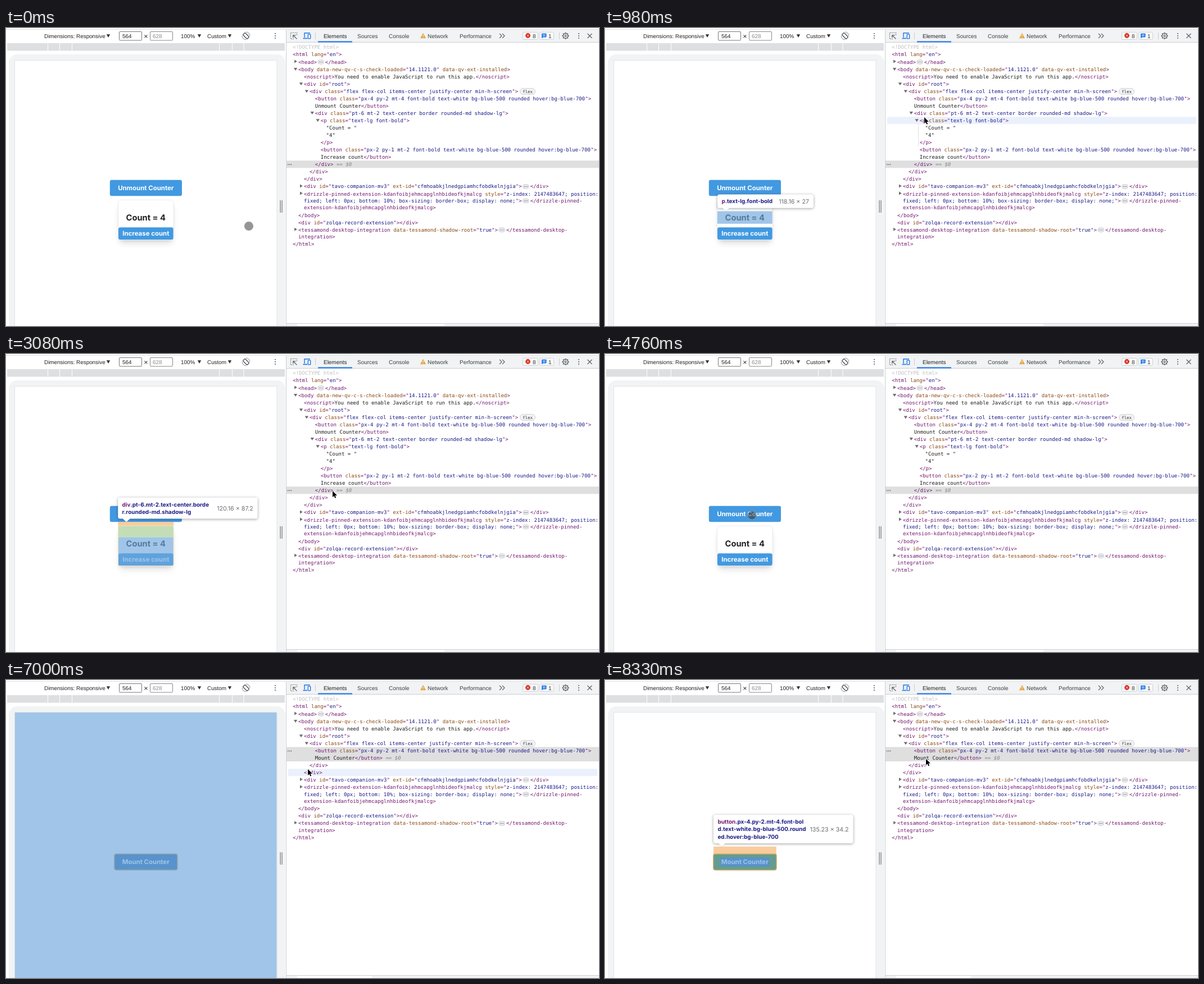
Animation of 1055x531 px, one loop 9380 ms. Source, as an HTML page with a canvas:

```html
<!DOCTYPE html>
<html lang="en">
<head>
<meta charset="utf-8">
<title>Counter inspection</title>
<style>
html, body { margin: 0; width: 100%; height: 100%; overflow: hidden; background: #fff; }
canvas { display: block; width: 1055px; height: 531px; }
</style>
</head>
<body>
<canvas id="stage" width="1055" height="531"></canvas>
<script>
const ctx = document.getElementById('stage').getContext('2d');
const LOOP = 9380, STEP = 70, UPDATE = 5600, FLASH = 1400;
const MONO = '"DejaVu Sans Mono", monospace';
const UI = '"Liberation Sans", Arial, sans-serif';
const APP = 'Inter, sans-serif';
const CHAR = 9.07 * 0.602;
const PURPLE = '#741a70', NAVY = '#1b1b88', BLUE = '#4299e1', GRAY = '#5f6368';
const PAGE = [16, 58, 465.5, 473];

// ---------- drawing helpers ----------
function rect(x, y, w, h, color) {
  ctx.fillStyle = color;
  ctx.fillRect(x, y, w, h);
}
function round(x, y, w, h, r, fill, stroke, lw = 1) {
  ctx.beginPath();
  ctx.roundRect(x, y, w, h, r);
  if (fill) { ctx.fillStyle = fill; ctx.fill(); }
  if (stroke) { ctx.strokeStyle = stroke; ctx.lineWidth = lw; ctx.stroke(); }
}
function line(points, color, lw = 1) {
  ctx.beginPath();
  points.forEach(([x, y]) => ctx.lineTo(x, y));
  ctx.strokeStyle = color;
  ctx.lineWidth = lw;
  ctx.stroke();
}
function poly(points, color) {
  ctx.beginPath();
  points.forEach(([x, y]) => ctx.lineTo(x, y));
  ctx.closePath();
  ctx.fillStyle = color;
  ctx.fill();
}
function dot(x, y, r, fill, stroke, lw = 1) {
  ctx.beginPath();
  ctx.arc(x, y, r, 0, Math.PI * 2);
  if (fill) { ctx.fillStyle = fill; ctx.fill(); }
  if (stroke) { ctx.strokeStyle = stroke; ctx.lineWidth = lw; ctx.stroke(); }
}
function text(s, x, cy, size, family, color, style = '', align = 'left') {
  ctx.font = `${style} ${size}px ${family}`;
  ctx.textAlign = align;
  ctx.fillStyle = color;
  ctx.fillText(s, x, cy + size * 0.36);
}
function shadow(color, blur, dy) {
  ctx.shadowColor = color;
  ctx.shadowBlur = blur;
  ctx.shadowOffsetY = dy;
}
const noShadow = () => shadow('transparent', 0, 0);

// ---------- element tree ----------
// Colour marks: ~ tag, ^ attribute, | value, _ text, @ note, % doctype
const INK = { '~': PURPLE, '^': '#8c4a14', '|': NAVY, '_': '#1c1c1e', '@': '#80868b', '%': '#c0c0c0' };
const attr = (name, value) => ` ^${name}~="|${value}~"`;
const open = (name, ...attrs) => `~<${name}${attrs.join('')}~>`;
const close = name => `~</${name}>`;
const cls = value => attr('class', value);
const blueButton = pad => open('button', cls(`${pad} font-bold text-white bg-blue-500 rounded hover:bg-blue-700`));
const PINNED = 'drizzle-pinned-extension-kdanfoibjehmcapglnhbideofkjmalcg';

// Each node: level, arrow, lines, extra
function makeTree(mounted) {
  const note = '@ == $0';
  const label = (mounted ? 'Unmount' : 'Mount') + ' Counter';
  const nodes = [
    [0, '', ['%<!DOCTYPE html>']],
    [0, '', [open('html', attr('lang', 'en'))], { hover: 'page' }],
    [1, '>', [open('head') + '…' + close('head')]],
    [1, 'v', [open('body', ' ^data-new-qv-c-s-check-loaded~="|14.1121.0~"', ' ^data-qv-ext-installed')], { hover: 'page' }],
    [2, '', [open('noscript') + '_You need to enable JavaScript to run this app.' + close('noscript')]],
    [2, 'v', [open('div', attr('id', 'root'))], { hover: 'page' }],
    [3, 'v', [open('div', cls('flex flex-col items-center justify-center min-h-screen'))], { hover: 'page', badge: true, flash: [[0, 1, 3]] }],
    [4, '', [blueButton('px-4 py-2 mt-4'), '_' + label + close('button') + (mounted ? '' : note)],
      { hover: mounted ? '' : 'mount', selected: !mounted, flash: [[0, 1, 6], [1, 0, 13]] }]
  ];
  if (mounted) nodes.push(
    [4, 'v', [open('div', cls('pt-6 mt-2 text-center border rounded-md shadow-lg'))], { hover: 'card' }],
    [5, 'v', [open('p', cls('text-lg font-bold'))], { hover: 'para', guide: 3 }],
    [6, '', ['_"Count = "'], { hover: 'para' }],
    [6, '', ['_"4"'], { hover: 'para' }],
    [5, '', [close('p')], { hover: 'para' }],
    [5, '', [blueButton('px-2 py-1 mt-2'), '_Increase count' + close('button')], { hover: 'inc' }],
    [4, '', [close('div') + note], { hover: 'card', selected: true }]
  );
  nodes.push(
    [3, '', [close('div')], { hover: 'page' }],
    [2, '', [close('div')], { hover: 'page' }],
    [2, '>', [open('div', attr('id', 'tavo-companion-mv3'), attr('ext-id', 'cfmhoabkjlnedgpiamhcfobdkelnjgia')) + '…' + close('div')]],
    [2, '>', [
      `~<${PINNED} ^style~="|z-index: 2147483647; position:`,
      '|fixed; left: 0px; bottom: 10\u0001; box-sizing: border-box; display: none;~">…</drizzle-pinned-',
      `~${PINNED.slice(15)}>`
    ]],
    [1, '', [close('body')], { hover: 'page' }],
    [1, '', [open('div', attr('id', 'zolqa-record-extension')) + close('div')]],
    [1, '>', [open('tessamond-desktop-integration', attr('data-tessamond-shadow-root', 'true')) + '…</tessamond-desktop-', '~integration>']],
    [0, '', [close('html')], { hover: 'page' }]
  );
  let y = 34;
  return nodes.map(([level, arrow, lines, extra = {}]) => {
    const node = { x: 510.2 + 9.9 * level, y, arrow, lines, ...extra };
    node.top = y - 6.5;
    node.bottom = y + 6.6 + 12.4 * (lines.length - 1);
    y += 13.14 + 12.4 * (lines.length - 1);
    return node;
  });
}
const trees = { on: makeTree(true), off: makeTree(false) };

// \u0001 stands for a literal percent sign
function code(s, x, y) {
  let ink = INK['~'], style = '';
  for (const part of s.split(/([~^|_@%…])/)) {
    if (part === '…') {
      round(x + 2, y - 3.5, 10.5, 7.5, 3.7, '#eceef0', '#b5b8bc', 0.7);
      for (let i = -1; i < 2; i++) dot(x + 7.2 + i * 2.4, y + 0.3, 0.7, '#555');
      x += 15;
    } else if (INK[part]) {
      ink = INK[part];
      style = part === '@' ? 'italic' : '';
    } else if (part) {
      text(part.replace('\u0001', '%'), x, y, 9.07, MONO, ink, style);
      x += part.length * CHAR;
    }
  }
  return x;
}

function drawTree(tree, hovered, t) {
  const glow = tree === trees.off && t < UPDATE + FLASH ? 1 - ((t - UPDATE) / FLASH) ** 2 : 0;
  for (const n of tree) {
    const h = n.bottom - n.top;
    if (n.selected) {
      rect(499, n.top, 556, h, '#dfdfe0');
      for (let i = 0; i < 3; i++) dot(501.7 + i * 2.9, n.y + 0.5, 0.9, '#6e6e6e');
    } else if (n === hovered) {
      round(502, n.top, 550, h, 2, '#ebf1fc');
      if (n.guide) rect(557, n.bottom, 1, 13.14 * n.guide, '#dddfe2');
    }
  }
  for (const n of tree) {
    const ax = n.x - 5, ay = n.y;
    if (n.arrow === 'v') poly([[ax - 3.2, ay - 2.4], [ax + 3.2, ay - 2.4], [ax, ay + 2.6]], '#6e6e6e');
    if (n.arrow === '>') poly([[ax - 2, ay - 3.8], [ax + 2.8, ay - 0.8], [ax - 2, ay + 2.2]], '#6e6e6e');
    if (glow > 0) for (const [row, from, len] of n.flash || []) {
      const ink = row ? `rgba(75,50,80,${glow * 0.85})` : `rgba(148,70,146,${glow})`;
      round(n.x + from * CHAR, n.y + row * 12.4 - 5.5, len * CHAR, 11, 1.5, ink);
    }
    n.lines.forEach((s, i) => code(s, n.x, n.y + i * 12.4));
    if (n.badge) {
      round(914.5, 107.5, 27, 11, 5.5, '#f1f3f4', '#cfd2d6', 1);
      text('flex', 928, 113.2, 7.4, MONO, '#333', '', 'center');
    }
  }
}

// ---------- browser chrome ----------
const caret = x => poly([[x - 3.2, 11.3], [x + 3.2, 11.3], [x, 17]], '#333');
const kebab = x => [-4, 0, 4].forEach(d => dot(x, 14 + d, 1.1, GRAY));

function drawDeviceBar() {
  rect(0, 2, 1055, 1, '#dedfe1');
  text('Dimensions: Responsive', 68, 14, 9.9, UI, '#222');
  caret(182);
  round(201.5, 6.5, 40, 15.5, 1.5, '#fff', '#777');
  text('564', 207, 14.5, 9.9, UI, '#222');
  text('×', 249, 14.5, 12.5, UI, '#222', '', 'center');
  round(256.5, 6.5, 40, 15.5, 1.5, '#fff', '#888');
  text('628', 261, 14.5, 9.9, UI, '#8a8a8a');
  text('100%', 311, 14, 9.9, UI, '#222');
  caret(344);
  text('Custom', 358, 14, 9.9, UI, '#222');
  caret(398);
  ctx.save();
  ctx.translate(427, 14);
  ctx.rotate(-Math.PI / 4);
  round(-2.7, -5.4, 5.4, 10.8, 1, null, '#4a4d51', 1.3);
  ctx.restore();
  for (const a of [-Math.PI / 4, Math.PI * 3 / 4]) {
    ctx.beginPath();
    ctx.arc(427, 14, 6.9, a - 0.8, a + 0.8);
    ctx.stroke();
  }
  kebab(479);
  const cuts = [2, 75, 96, 118, 380, 403, 423.5, 497];
  for (let i = 0; i < 7; i++) rect(cuts[i], 27, cuts[i + 1] - cuts[i] - 1, 13.5, '#dedfe0');
}

function drawTabs() {
  rect(499, 3, 556, 22, '#f1f3f4');
  rect(499, 25, 556, 1, '#cacdd1');
  rect(498, 3, 1, 528, '#cacdd1');
  rect(555, 23.5, 61, 2, '#1a73e8');
  ctx.setLineDash([1.5, 1.5]);
  line([[512, 19.5], [506.5, 19.5], [506.5, 8.5], [517.5, 8.5], [517.5, 13]], GRAY, 1.2);
  ctx.setLineDash([]);
  line([[517.5, 19.5], [511, 13]], GRAY, 1.3);
  line([[510.8, 17.5], [510.8, 12.8], [515.6, 12.8]], GRAY, 1.3);
  line([[541, 9], [531, 9], [531, 17]], '#1a73e8', 1.4);
  line([[528.5, 18.5], [536, 18.5]], '#1a73e8', 1.6);
  round(537.3, 11.3, 4.4, 7.6, 0.6, null, '#1a73e8', 1.3);
  rect(550, 8, 1, 12, '#cacdd1');
  [['Elements', 565], ['Sources', 625], ['Console', 681], ['Network', 750], ['Performance', 807]]
    .forEach(([s, x], i) => text(s, x, 14, 9.95, UI, i ? '#3c4043' : '#222'));
  poly([[742, 9], [747, 18.2], [737, 18.2]], '#e8a33d');
  rect(741.5, 12, 1, 3.2, '#fff');
  rect(741.5, 16, 1, 1, '#fff');
  for (const x of [878, 883]) line([[x, 10], [x + 4, 14], [x, 18]], GRAY, 1.2);

  round(919.5, 7.5, 27, 13, 2, '#f8f9fa', '#cfd2d6');
  dot(928.5, 13.5, 4.4, '#d93025');
  line([[926.8, 11.8], [930.2, 15.2]], '#fff');
  line([[930.2, 11.8], [926.8, 15.2]], '#fff');
  text('8', 937, 14, 9.9, UI, '#333');
  round(949.5, 7.5, 25, 13, 2, '#f8f9fa', '#cfd2d6');
  round(953, 9.8, 8.5, 6.6, 0.8, '#1a73e8');
  poly([[953, 15], [956.5, 15], [953, 18.8]], '#1a73e8');
  rect(954.7, 11.5, 5, 0.9, '#fff');
  rect(954.7, 13.6, 5, 0.9, '#fff');
  text('1', 965, 14, 9.9, UI, '#333');
  rect(984, 8, 1, 12, '#cacdd1');

  for (let i = 0; i < 8; i++) {
    const a = i * Math.PI / 4, c = Math.cos(a), s = Math.sin(a);
    line([[995.5 + 4 * c, 14 + 4 * s], [995.5 + 6 * c, 14 + 6 * s]], GRAY, 2);
  }
  dot(995.5, 14, 4.3, '#f1f3f4', GRAY, 1.3);
  dot(995.5, 14, 1.6, null, GRAY, 1.1);
  kebab(1019);
  line([[1034.5, 10], [1042.5, 18]], GRAY, 1.2);
  line([[1042.5, 10], [1034.5, 18]], GRAY, 1.2);
}

function drawCrumbs(mounted) {
  rect(499, 526, 556, 5, '#f1f3f4');
  rect(499, 526, 556, 1, '#cacdd1');
  rect(518, 527, mounted ? 262 : 133, 4, '#fff');
}

// ---------- page ----------
const RECTS = {
  unmount: [184.8, 270.8, 128.2, 28.4],
  mount: [193, 310.1, 111.8, 28.3],
  card: [199.2, 305.8, 99.2, 72],
  para: [200, 326.5, 97.6, 22.3],
  inc: [200, 355.3, 97.6, 21.7]
};
const label = (s, y, size, color) => text(s, 248.8, y, size, APP, color, 'bold', 'center');

function drawPage(mounted) {
  round(5, 47, 492, 500, 15, '#f1f3f4');
  rect(15, 57, 467.5, 474, '#e1e3e5');
  rect(...PAGE, '#fff');
  for (const x of [487.5, 490.5]) rect(x, 307, 1.2, 22, '#777');
  if (mounted) {
    round(...RECTS.unmount, 3.3, BLUE);
    label('Unmount Counter', 285, 11.45, '#fff');
    shadow('rgba(0,0,0,.13)', 12, 8);
    round(202, 308.5, 94, 67, 5, '#fff');
    shadow('rgba(0,0,0,.08)', 5, 3);
    round(201, 307.5, 96, 69, 5, '#fff');
    noShadow();
    round(...inset(RECTS.card, 0.4, 0.4, 0.4), 5, '#fff', '#e2e8f0', 0.8);
    label('Count = 4', 337.5, 14.7, '#222');
    round(...RECTS.inc, 3.3, BLUE);
    label('Increase count', 366, 11.45, '#fff');
  } else {
    round(...RECTS.mount, 3.3, '#2b6cb0', '#d0913f', 1.6);
    label('Mount Counter', 324, 11.45, '#fff');
  }
}

// ---------- inspection overlay ----------
const TINT = {
  content: 'rgba(111,168,220,.66)', padding: 'rgba(147,196,125,.55)',
  border: 'rgba(255,229,153,.66)', margin: 'rgba(246,178,107,.66)'
};
// pad: sides, top, bottom; tip: width, label lines, size
const BOXES = {
  page: { box: PAGE },
  para: { box: RECTS.para, tip: [171, ['p', '.text-lg.font-bold'], '118.16 × 27'] },
  card: {
    box: RECTS.card, margin: 6.6, border: 0.8, pad: [0, 19.9, 0],
    tip: [248.5, ['div', '.pt-6.mt-2.text-center.borde', 'r.rounded-md.shadow-lg'], '120.16 × 87.2']
  },
  inc: {
    box: RECTS.inc, margin: 6.6, pad: [6.6, 3.3, 3.3],
    tip: [248.5, ['button', '.px-2.py-1.mt-2.font-bol', 'd.text-white.bg-blue-500.round', 'ed.hover:bg-blue-700'], '118.16 × 26.2']
  },
  mount: {
    box: RECTS.mount, margin: 13.2, pad: [13.2, 6.6, 6.6],
    tip: [248.5, ['button', '.px-4.py-2.mt-4.font-bol', 'd.text-white.bg-blue-500.round', 'ed.hover:bg-blue-700'], '135.23 × 34.2']
  }
};
function inset([x, y, w, h], side, top, bottom) {
  return [x + side, y + top, w - 2 * side, h - top - bottom];
}
function ring(outer, inner, color) {
  ctx.beginPath();
  ctx.rect(...outer);
  ctx.rect(...inner);
  ctx.fillStyle = color;
  ctx.fill('evenodd');
}

function drawOverlay({ box, margin = 0, border = 0, pad = [0, 0, 0], tip }) {
  const [x, y, w] = box;
  if (margin) rect(x, y - margin, w, margin, TINT.margin);
  const inner = inset(box, border, border, border);
  const content = inset(inner, ...pad);
  if (border) ring(box, inner, TINT.border);
  ring(inner, content, TINT.padding);
  rect(...content, TINT.content);
  if (tip) drawTip(x, y - margin + 0.2, ...tip);
}

function drawTip(x, tipY, w, [tag, ...lines], size) {
  const h = 11 + 13.3 * lines.length, top = tipY - 6 - h, a = x + 15;
  shadow('rgba(0,0,0,.38)', 5, 1);
  round(x, top, w, h, 3.5, '#fff');
  noShadow();
  poly([[a - 7, top + h - 0.5], [a + 7, top + h - 0.5], [a, tipY]], '#fff');
  line([[a - 7, top + h], [a, tipY], [a + 7, top + h]], 'rgba(0,0,0,.13)', 0.8);
  const tx = x + 7.4;
  text(tag, tx, top + 12.3, 9.95, APP, PURPLE, 'bold');
  const tagWidth = ctx.measureText(tag).width;
  lines.forEach((s, i) => text(s, tx + (i ? 0 : tagWidth), top + 12.3 + 13.3 * i, 9.95, APP, NAVY, 'bold'));
  text(size, x + w - 8, top + h / 2 + 0.3, 10.7, APP, '#6b6e72', '', 'right');
}

// ---------- pointer ----------
const PATH = [
  [0, 432, 353], [350, 432, 353], [560, 470, 230], [630, 506, 170], [770, 538, 110],
  [980, 568, 159], [1260, 576, 162], [1680, 585, 183], [2100, 592, 216], [2240, 592, 217],
  [2660, 585, 228], [3080, 581, 244], [3430, 581, 244], [3710, 338, 247], [3850, 338, 247],
  [4130, 262, 283], [4200, 262, 283], [4410, 277, 281], [4550, 260, 288], [4620, 260, 288],
  [4760, 261.5, 287.5], [5460, 261.5, 287.5], [5600, 265, 285], [6300, 425, 212], [6440, 433, 211],
  [6650, 478, 195], [6860, 520, 172], [7000, 537, 158.7], [7210, 541, 150], [7420, 546, 141.5],
  [7560, 548, 141], [7910, 575, 138], [8120, 576, 142], [8330, 571, 140.5], [LOOP, 571, 140.5]
];
function pointer(t) {
  const i = PATH.findIndex(p => p[0] > t);
  const [t0, x0, y0] = PATH[i - 1], [t1, x1, y1] = PATH[i];
  const u = (t - t0) / (t1 - t0), k = u * u * (3 - 2 * u);
  return [x0 + (x1 - x0) * k, y0 + (y1 - y0) * k];
}

function drawPointer(x, y, t) {
  if (x < 498) {
    if (t >= 5320 && t < 5390) dot(264, 288, 19, 'rgba(60,60,60,.2)');
    dot(x, y, 7.6, 'rgba(38,38,38,.49)', 'rgba(150,150,150,.75)', 1.2);
    return;
  }
  const shape = [[0, 0], [0, 11.2], [2.6, 8.8], [4.3, 12.8], [6.2, 12], [4.5, 8.1], [8, 8]]
    .map(([dx, dy]) => [x + dx, y + dy]);
  ctx.lineJoin = 'round';
  line([...shape, shape[0]], '#fff', 2);
  ctx.lineJoin = 'miter';
  poly(shape, '#000');
}

// ---------- loop ----------
function draw(now) {
  const t = Math.floor((now % LOOP) / STEP) * STEP;
  const mounted = t < UPDATE;
  const tree = mounted ? trees.on : trees.off;
  const [x, y] = pointer(t);
  const hovered = x >= 498 ? tree.find(n => y >= n.top && y < n.bottom) : null;

  ctx.textRendering = 'geometricPrecision';
  rect(0, 0, 1055, 531, '#fff');
  drawPage(mounted);
  if (hovered && hovered.hover) drawOverlay(BOXES[hovered.hover]);
  drawDeviceBar();
  drawTabs();
  drawTree(tree, hovered, t);
  drawCrumbs(mounted);
  drawPointer(x, y, t);
}

const start = performance.now();
function tick() {
  draw(performance.now() - start);
  requestAnimationFrame(tick);
}
tick();
</script>
</body>
</html>
```
